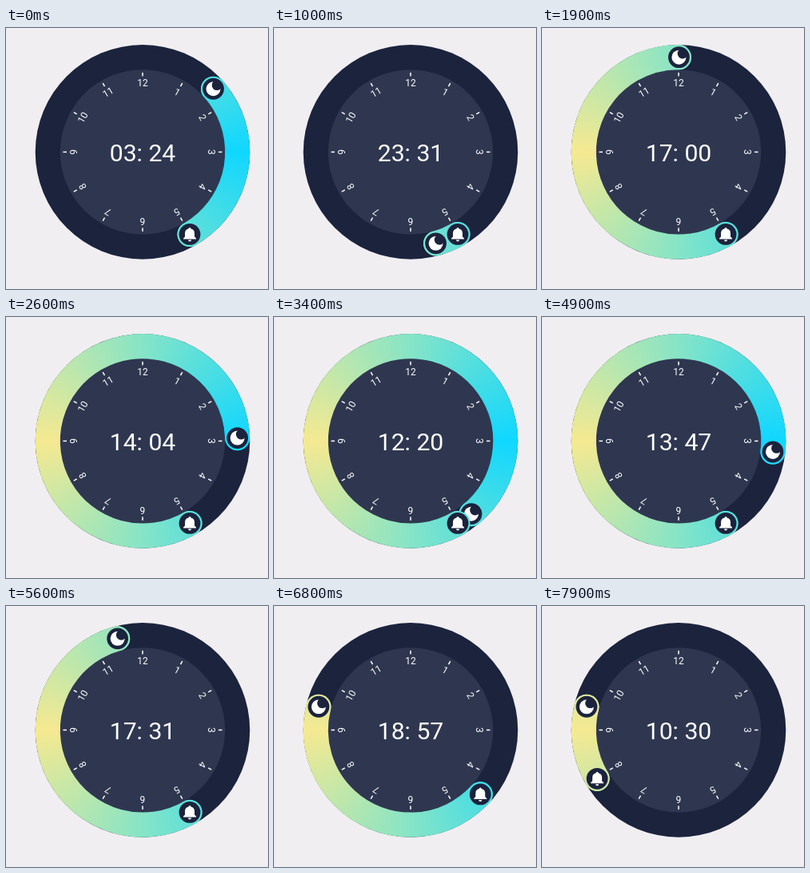
These frames come from a looping animation (328x327 px, 8 s). An HTML page with a canvas:

```html
<!DOCTYPE html>
<html lang="en">
<head>
<meta charset="utf-8">
<title>Sleep timer dial</title>
<style>
  html, body { margin: 0; width: 100%; height: 100%; overflow: hidden; background: #f0eef1; }
  canvas { display: block; }
</style>
</head>
<body>
<canvas id="dial" width="328" height="327"></canvas>
<script>
const ctx = document.getElementById('dial').getContext('2d');
const LOOP = 8000, STEP = 100;
const CX = 171, CY = 155.4, OUTER = 134.3, INNER = 103.2;
const TRACK = (OUTER + INNER) / 2, BAND = OUTER - INNER;
const NAVY = '#1b233d', FACE = '#2f3750', PAPER = '#f0eef1';
const CYAN = '#10d7ff', MINT = '#86e4c6', YELLOW = '#f5e991';

// Where the drag changes pace: [ms, degrees clockwise from 12], laps unwrapped.
const DRAG = [[0, 48.2], [900, 148], [1900, 360.2], [3400, 500.2],
  [4200, 502.2], [5400, 393], [5600, 344.7], [6100, 284.2]];

const bellShape = new Path2D('M-8 6V5l2-2v-4a6 6 0 0 1 4.5-6a1.5 1.5 0 0 1 3 0' +
  'a6 6 0 0 1 4.5 6v4l2 2v1zM-2 7h4a2 2 0 0 1-4 0z');

const rad = deg => (deg - 90) * Math.PI / 180;

const sweep = ctx.createConicGradient(0, CX, CY);
[CYAN, MINT, YELLOW, MINT, CYAN].forEach((color, i) => sweep.addColorStop(i / 4, color));

const slope = i => (DRAG[i + 1][1] - DRAG[i][1]) / (DRAG[i + 1][0] - DRAG[i][0]);

// Harmonic mean of the neighbouring slopes: smooth without overshoot.
function tangent(i) {
  if (i === 0 || i === DRAG.length - 1) return 0;
  const a = slope(i - 1), b = slope(i);
  return a * b > 0 ? 2 * a * b / (a + b) : 0;
}

function moonAngle(t) {
  const next = DRAG.findIndex(key => key[0] > t);
  if (next < 0) return DRAG[DRAG.length - 1][1];
  const i = next - 1, [t0, a0] = DRAG[i], [t1, a1] = DRAG[next];
  const span = t1 - t0, u = (t - t0) / span, v = 1 - u;
  return a0 + (a1 - a0) * u * u * (3 - 2 * u)
    + span * u * v * (v * tangent(i) - u * tangent(next));
}

// The bell rests, then is dragged back at constant speed.
const bellAngle = t => 150.2 - .2305 * Math.max(0, t - 6724);

function disc(x, y, r, color) {
  ctx.fillStyle = color;
  ctx.beginPath();
  ctx.arc(x, y, r, 0, Math.PI * 2);
  ctx.fill();
}

function drawArc(a, b) {
  const start = Math.min(a, b), length = Math.abs(a - b) % 360;
  ctx.strokeStyle = sweep;
  ctx.lineWidth = BAND;
  ctx.lineCap = 'round';
  ctx.beginPath();
  ctx.arc(CX, CY, TRACK, rad(start), rad(start + length));
  ctx.stroke();
}

function drawMarks() {
  ctx.font = '12px Roboto, sans-serif';
  ctx.fillStyle = '#fff';
  for (let h = 1; h <= 12; h++) {
    ctx.save();
    ctx.translate(CX, CY);
    ctx.rotate(h * Math.PI / 6);
    ctx.fillRect(-.75, -99.5, 1.5, 4.5);
    ctx.fillText(h, 0, -82.4);
    ctx.restore();
  }
}

function drawHandle(angle, icon) {
  ctx.save();
  const x = CX + TRACK * Math.cos(rad(angle)), y = CY + TRACK * Math.sin(rad(angle));
  disc(x, y, BAND / 2, sweep);
  disc(x, y, 13.4, NAVY);
  ctx.translate(x, y);
  icon();
  ctx.restore();
}

function moonIcon() {
  disc(0, 0, 9, '#fff');
  disc(4.6, -4.6, 6.4, NAVY);
}

function bellIcon() {
  ctx.fillStyle = '#fff';
  ctx.fill(bellShape);
}

function drawTime(moon, bell) {
  const minutes = Math.round((bell - moon + 1440) % 720 * 2) % 1440;
  const pad = n => String(n).padStart(2, '0');
  ctx.font = '30.2px Roboto, sans-serif';
  ctx.fillStyle = '#fff';
  ctx.fillText(pad(Math.floor(minutes / 60)) + ': ' + pad(minutes % 60), CX, 166.8);
}

function draw(ms) {
  const t = Math.floor(ms % LOOP / STEP) * STEP;
  const moon = moonAngle(t), bell = bellAngle(t);
  ctx.fillStyle = PAPER;
  ctx.fillRect(0, 0, 328, 327);
  ctx.textAlign = 'center';
  disc(CX, CY, OUTER, NAVY);
  disc(CX, CY, INNER, FACE);
  drawArc(moon, bell);
  drawMarks();
  drawHandle(moon, moonIcon);
  drawHandle(bell, bellIcon);
  drawTime(moon, bell);
}

const begin = performance.now();
function tick() {
  draw(performance.now() - begin);
  requestAnimationFrame(tick);
}
tick();
</script>
</body>
</html>
```
